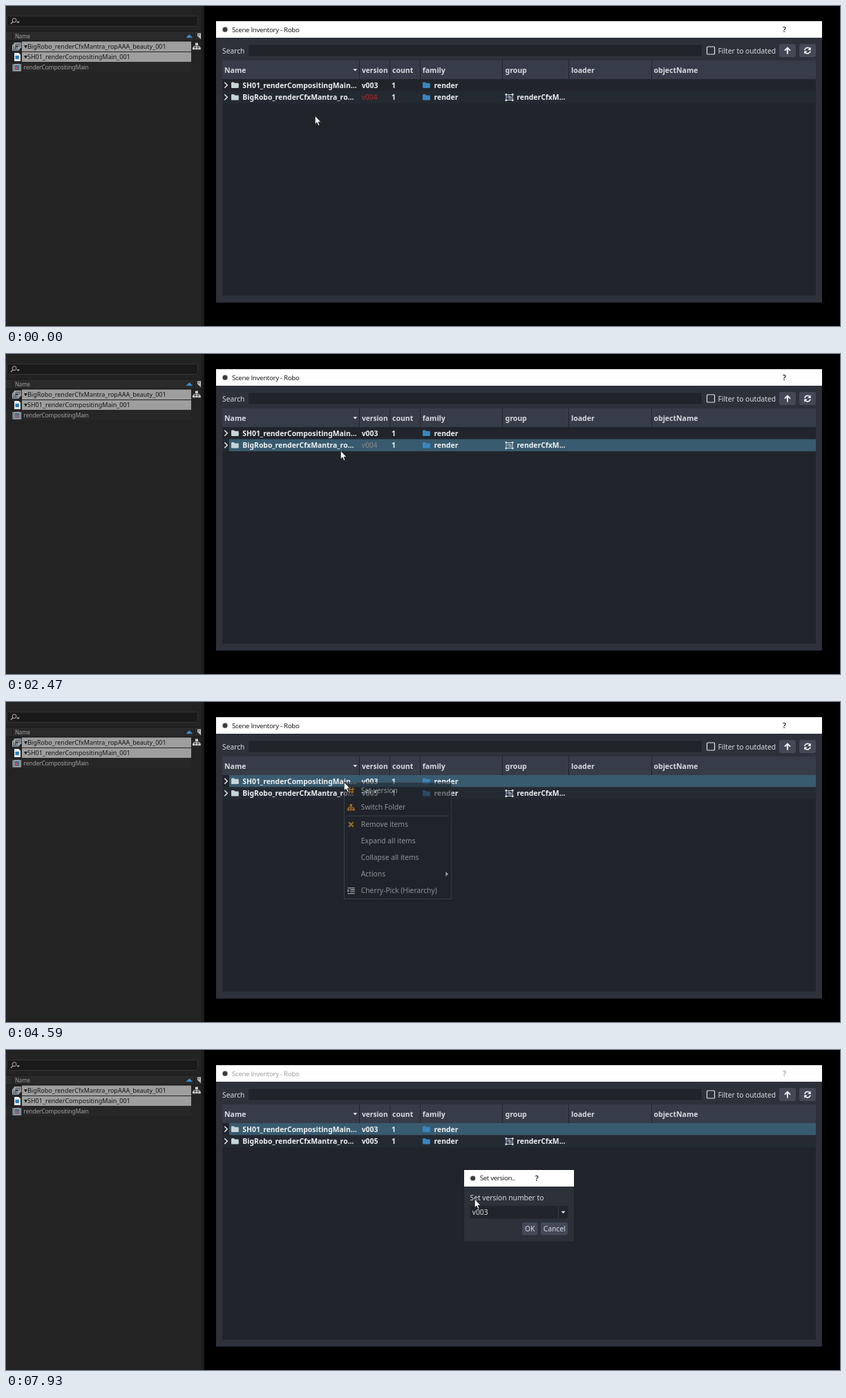
These frames come from a looping animation (1207x464 px, 8 s). An HTML page:

```html
<!DOCTYPE html>
<html lang="en">
<head>
<meta charset="utf-8">
<title>Scene inventory</title>
<style>
html, body { margin: 0; width: 100%; height: 100%; overflow: hidden; background: #000; }
svg { display: block; width: 1207px; height: 464px; }
text { font: 10.25px "Noto Sans", sans-serif; fill: #d9dde2; white-space: pre; }
.b { font-weight: 700; font-size: 10.4px; fill: #eef1f3; }
.head text { font-weight: 700; font-size: 10.5px; fill: #d6dbe1; }
.title text { font: 9.7px "Open Sans", "Noto Sans", sans-serif; letter-spacing: -.3px; fill: currentColor; }
.title .q { font-size: 11px; font-weight: 600; }
.title path { stroke: currentColor; stroke-width: 1; fill: none; }
.side text { font-size: 9px; fill: #151515; }
.side .dim { font-size: 8.6px; letter-spacing: -.22px; fill: #a0a0a0; }
.line { fill: none; stroke: #eef1f3; stroke-width: 1.4; }
.hot { fill: #4a4e57; }

/* One 8 s loop drives everything; 1% = 80 ms. */
.cursor, .row1, .row2, .old, .new, .menu1, .menu2, .on1, .on2, .on3, .dialog, .main {
  animation: 8s step-end infinite;
}
.cursor { animation-name: cursor; animation-timing-function: linear; }
.row1 { animation-name: row1; }
.row2 { animation-name: row2; }
.old { animation-name: old; }
.new { animation-name: new; }
.menu1 { animation-name: menu1; }
.menu2 { animation-name: menu2; }
.on1 { animation-name: on1; }
.on2 { animation-name: on2; }
.on3 { animation-name: on3; }
.main { animation-name: main; }
.dialog { animation-name: dialog; transform-box: fill-box; transform-origin: center; }

@keyframes cursor {
  0% { transform: translate(447px, 159px); }
  2.5% { transform: translate(447px, 159px); animation-timing-function: steps(5, jump-both); }
  6.625% { transform: translate(460px, 131px); }
  21.75% { transform: translate(460px, 131px); animation-timing-function: steps(4, jump-both); }
  25.125% { transform: translate(484px, 140px); }
  45.375% { transform: translate(484px, 140px); animation-timing-function: steps(2, jump-start); }
  47.125% { transform: translate(486px, 157px); animation-timing-function: steps(2, jump-both); }
  48.875% { transform: translate(488px, 119px); animation-timing-function: steps(5, jump-end); }
  54% { transform: translate(489px, 116px); }
  63.25% { transform: translate(489px, 116px); animation-timing-function: steps(8, jump-both); }
  70.25% { transform: translate(525px, 159px); }
  82.875% { transform: translate(525px, 159px); animation-timing-function: steps(3, jump-both); }
  85.5% { transform: translate(531px, 139px); }
  90.625% { transform: translate(531px, 139px); animation-timing-function: steps(7, jump-both); }
  96.5% { transform: translate(656px, 207px); }
  97.375% { transform: translate(656px, 207px); animation-timing-function: steps(2, jump-both); }
  99.125%, 100% { transform: translate(678px, 216px); }
}
@keyframes row1 {
  0% { fill: #21252b; }
  48.875% { fill: #4a4e57; }
  55.625%, 100% { fill: #395b6f; }
}
@keyframes row2 {
  0% { fill: #242a32; }
  5% { fill: #4a4e57; }
  12.375% { fill: #395b6f; }
  37% { fill: #4a4e57; }
  45.375% { fill: #242a32; }
  48% { fill: #4a4e57; }
  48.875%, 100% { fill: #242a32; }
}
@keyframes old {
  0% { fill: #b42828; opacity: 1; }
  29.25% { fill: #8f8a88; opacity: 1; }
  37%, 100% { opacity: 0; }
}
@keyframes new { 0% { opacity: 0; } 37%, 100% { opacity: 1; } }
@keyframes menu1 {
  0% { opacity: 0; }
  13.25% { opacity: .02; }
  14.125% { opacity: .2; }
  15% { opacity: .6; }
  15.75% { opacity: 1; }
  29.25% { opacity: .4; }
  30.125% { opacity: .1; }
  30.875%, 100% { opacity: 0; }
}
@keyframes menu2 {
  0% { opacity: 0; }
  56.5% { opacity: .2; }
  57.375% { opacity: .6; }
  58.25% { opacity: 1; }
  87.25% { opacity: .4; }
  88.125% { opacity: .1; }
  88.875%, 100% { opacity: 0; }
}
@keyframes on1 { 0% { opacity: 0; } 21.75%, 100% { opacity: 1; } }
@keyframes on2 {
  0% { opacity: 0; }
  63.25% { opacity: 1; }
  67.625% { opacity: 0; }
  85.5%, 100% { opacity: 1; }
}
@keyframes on3 {
  0% { opacity: 0; }
  67.625% { opacity: 1; }
  85.5%, 100% { opacity: 0; }
}
@keyframes main { 0% { color: #111; } 89.75%, 100% { color: #999; } }
@keyframes dialog {
  0% { opacity: 0; transform: scale(.92); }
  89.75% { opacity: .3; transform: scale(.95); }
  90.625% { opacity: .75; transform: scale(.98); }
  91.5%, 100% { opacity: 1; transform: none; }
}
</style>
</head>
<body>
<svg viewBox="0 0 1207 464">
  <defs>
    <path id="folder" d="M0 1.2Q0 0 1.2 0H3.8L5.2 1.4H9.6Q10.8 1.4 10.8 2.6V7.4Q10.8 8.6 9.6 8.6H1.2Q0 8.6 0 7.4Z"/>
    <path id="chevron" class="line" d="M0 0L4 4L0 8"/>
    <path id="down" fill="#e6e9ec" d="M0 0H6L3 3.2Z"/>
    <path id="cross" d="M0 0L8.6 8.6M8.6 0L0 8.6"/>
    <!-- Menu entries shared by both context menus -->
    <g id="entries">
      <g fill="none" stroke="#ee9a24" stroke-width="1.4">
        <path d="M8.8 7.3L7.3 16.7M12.8 7.3L11.3 16.7M5.6 10.2H15M5 13.8H14.4"/>
        <path stroke-width="1.1" d="M10 34V39M6.3 38.5V36.3H13.7V38.5"/>
        <path stroke-width="2.2" d="M6.7 57.7L13.3 64.3M13.3 57.7L6.7 64.3"/>
      </g>
      <path fill="#ee9a24" d="M8.2 31.3H11.8V34.6H8.2ZM4.5 38H8V41H4.5ZM8.7 38H11.3V41H8.7ZM12 38H15.5V41H12Z"/>
      <path stroke="#4b5362" d="M3 48.5H152"/>
      <text x="24.5" y="15.7">Set version</text>
      <text x="24.5" y="39.7">Switch Folder</text>
      <text x="24.5" y="64.7">Remove items</text>
      <text x="24.5" y="88.7">Expand all items</text>
      <text x="24.5" y="112.7">Collapse all items</text>
      <text x="24.5" y="136.7">Actions</text>
      <text x="24.5" y="160.7">Cherry-Pick (Hierarchy)</text>
      <path fill="#e6e9ec" d="M147 129.5L151 133L147 136.5Z"/>
      <path class="line" d="M5 153H15.5M9 155.7H15.5M9 158.3H15.5M5 161H15.5"/>
      <path fill="#eef1f3" d="M5 154.7L7.8 157L5 159.3Z"/>
    </g>
  </defs>

  <rect width="1207" height="464"/>

  <g class="side">
    <rect width="287" height="464" fill="#232323"/>
    <rect x="283" width="4" height="464" fill="#1b1b1b"/>
    <rect x="1.5" y="14.5" width="276" height="15" rx="2" fill="#1a1a1a" stroke="#343434"/>
    <circle cx="12" cy="20.7" r="2.9" fill="none" stroke="#b5b5b5"/>
    <path fill="none" stroke="#b5b5b5" stroke-width="1.2" d="M10 22.8L7 26"/>
    <path fill="#b5b5b5" d="M15 22.5H20L17.5 25Z"/>
    <rect y="37" width="283" height="13" fill="#2a2a2a"/>
    <path stroke="#171717" d="M0 36.5H283M0 50.5H283M9.5 38V50M272.5 38V50"/>
    <text class="dim" x="13" y="47" style="font-size:8px">Name</text>
    <path fill="#378fd6" d="M260.5 46L265.3 41.3L270 46Z"/>
    <path fill="#c4c4c4" d="M277 39.5H282V48L277 43.5Z"/>
    <circle cx="279.2" cy="41.8" r=".9" fill="#2a2a2a"/>
    <rect y="82" width="268" height="14" fill="#272727"/>
    <path fill="#9e9e9e" d="M23 51.5H268V66H23ZM23 67H268V81H23Z"/>
    <path fill="#1a1a1a" d="M26 57H31L28.5 61.5ZM26 72H31L28.5 76.5Z"/>
    <text x="31" y="62">BigRobo_renderCfxMantra_ropAAA_beauty_001</text>
    <text x="31" y="77">SH01_renderCompositingMain_001</text>
    <text class="dim" x="25.5" y="92.3">renderCompositingMain</text>
    <g fill="#303a42" stroke="#b9b9b9">
      <path d="M12.5 53.5H21.5V60.5H12.5ZM11 55H19.8V62.3H11ZM9.5 57H18.3V64.3H9.5Z"/>
      <path stroke="#6f98b8" d="M11.5 62L13.6 59.7L16 62"/>
    </g>
    <path fill="#e4e8ec" d="M12 68H18.5L21 70.5V80H12Z"/>
    <path fill="#2d80bd" d="M13.5 72H18.8V77H13.5Z"/>
    <path fill="#b0b0b0" d="M9.5 84H22V94.5H9.5Z"/>
    <path stroke="#333" stroke-width="1.2" stroke-dasharray="1.3 1.3" d="M11 84V94.5M20.5 84V94.5"/>
    <path fill="#416f96" d="M12.5 85.5H19V93H12.5Z"/>
    <circle cx="15" cy="90.2" r="2" fill="#b8594d"/>
    <path fill="#c8c8c8" d="M273.8 53.5H278V57H273.8ZM270 60H273.5V63.3H270ZM274.2 60H277.6V63.3H274.2ZM278.3 60H281.8V63.3H278.3Z"/>
    <path fill="none" stroke="#c8c8c8" d="M276 57V60M271.7 60V58.5H280V60"/>
  </g>

  <rect x="304" y="22" width="877" height="408" fill="#2c313a"/>
  <rect x="304" y="22" width="877" height="24" fill="#fff"/>
  <circle cx="317" cy="34.2" r="3.6" fill="#3a3d40"/>
  <g class="title main">
    <text x="327" y="37.8">Scene Inventory - Robo</text>
    <text class="q" x="1126.3" y="38" text-anchor="middle">?</text>
    <use href="#cross" x="1158" y="29.5"/>
  </g>

  <text x="313" y="68.7">Search</text>
  <rect x="350.5" y="55.5" width="657" height="18" rx="3" fill="#21252b" stroke="#303640"/>
  <rect x="1014.5" y="59" width="11" height="11" rx="1" fill="none" stroke="#e1e5e9" stroke-width="1.2"/>
  <text x="1030.5" y="68.7">Filter to outdated</text>
  <rect x="1119" y="55" width="24" height="19" rx="3" fill="#434a56"/>
  <rect x="1148" y="55" width="24" height="19" rx="3" fill="#434a56"/>
  <path class="line" stroke-width="2" style="stroke-width:2" d="M1131 69.5V61M1127 64.6L1131 60.6L1135 64.6"/>
  <path class="line" style="stroke-width:1.6" d="M1156 63.8A4.1 4.1 0 0 1 1163.3 62M1164 65.4A4.1 4.1 0 0 1 1156.7 67.2"/>
  <path fill="#eef1f3" d="M1164.8 59.5V64H1160.3ZM1155.2 69.7V65.2H1159.7Z"/>

  <rect x="313" y="79" width="859" height="341" fill="#21252b"/>
  <g class="head">
    <rect x="313" y="79" width="859" height="27" fill="#373d48"/>
    <path stroke="#21252b" d="M511.5 79V106M555.5 79V106M599.5 79V106M718.5 79V106M814.5 79V106M934.5 79V106"/>
    <text x="316" y="96.6">Name</text>
    <text x="515" y="96.6" style="font-size:10.2px">version</text>
    <text x="559" y="96.6">count</text>
    <text x="602.7" y="96.6">family</text>
    <text x="722.5" y="96.6">group</text>
    <text x="818" y="96.6">loader</text>
    <text x="937.5" y="96.6">objectName</text>
    <use href="#down" x="502.3" y="91.3"/>
  </g>

  <rect x="313" y="123" width="859" height="18" fill="#242a32"/>
  <rect class="row1" x="323" y="106" width="849" height="17.5" fill="#21252b"/>
  <rect class="row2" x="323" y="123.5" width="849" height="17.5" fill="#242a32"/>
  <use href="#chevron" x="316.3" y="110.8"/>
  <use href="#chevron" x="316.3" y="128.3"/>
  <use href="#folder" x="326" y="110.4" fill="#c6d4d8"/>
  <use href="#folder" x="326" y="128" fill="#c6d4d8"/>
  <use href="#folder" x="603" y="110.4" fill="#3a86c1"/>
  <use href="#folder" x="603" y="128" fill="#3a86c1"/>
  <text class="b" x="342.3" y="118.7">SH01_renderCompositingMain...</text>
  <text class="b" x="342.3" y="136.3">BigRobo_renderCfxMantra_ro...</text>
  <text class="b" x="514.7" y="118.7">v003</text>
  <text class="old" x="514.7" y="136.3">v004</text>
  <g class="new"><text class="b" x="514.7" y="136.3">v005</text></g>
  <text class="b" x="558" y="118.7">1</text>
  <text class="b" x="558" y="136.3">1</text>
  <text class="b" x="619.5" y="118.7">render</text>
  <text class="b" x="619.5" y="136.3">render</text>
  <text class="b" x="739.3" y="136.3">renderCfxM...</text>
  <g fill="none" stroke="#cfd6dc">
    <path d="M724 128.5H733V136.5H724Z"/>
    <path stroke="#9aa9c0" d="M726.3 130.5H729.5V133H726.3ZM728.3 131.8H731V134.5H728.3Z"/>
    <path fill="#cfd6dc" stroke="none" d="M722.5 127H725V129.5H722.5ZM732 127H734.5V129.5H732ZM722.5 135.5H725V138H722.5ZM732 135.5H734.5V138H732Z"/>
  </g>

  <g class="menu1" opacity="0">
    <rect x="463" y="133" width="155" height="194" fill="#000" opacity=".22"/>
    <rect x="460.5" y="130.5" width="154.5" height="193.5" fill="#21252b" stroke="#4b5362"/>
    <rect class="hot on1" x="461" y="131" width="153.5" height="24"/>
    <path fill="none" stroke="#ee9a24" stroke-width="1.4" d="M466.5 142.5L470 139L473.5 142.5M466.5 147L470 143.5L473.5 147"/>
    <text x="484.5" y="146.7">Update to latest</text>
    <use href="#entries" x="460" y="155"/>
  </g>

  <g class="menu2" opacity="0">
    <rect x="492" y="119" width="155" height="169" fill="#000" opacity=".22"/>
    <rect x="489.5" y="116.5" width="155.5" height="169" fill="#21252b" stroke="#4b5362"/>
    <rect class="hot on2" x="490" y="117" width="154.5" height="24"/>
    <rect class="hot on3" x="490" y="141" width="154.5" height="24"/>
    <use href="#entries" x="489.3" y="116.6"/>
  </g>

  <g class="dialog" opacity="0">
    <rect x="662.5" y="174" width="160" height="104" fill="#2c313a" stroke="#1d2127"/>
    <rect x="663" y="174" width="159" height="24" fill="#fff"/>
    <circle cx="675.7" cy="186" r="3.6" fill="#3a3d40"/>
    <g class="title" color="#111">
      <text x="685.7" y="189.3">Set version..</text>
      <text class="q" x="768" y="189.5" text-anchor="middle">?</text>
      <use href="#cross" x="799.6" y="181"/>
    </g>
    <text x="671.5" y="217.7">Set version number to</text>
    <rect x="671.5" y="226" width="141.5" height="18.5" rx="2" fill="#21252b"/>
    <path stroke="#373d48" d="M799.5 226V244.5"/>
    <text x="674.8" y="239.4">v003</text>
    <use href="#down" x="803.5" y="233.8"/>
    <rect x="747" y="250" width="22.5" height="18.5" rx="3" fill="#434a56"/>
    <rect x="774" y="250" width="39" height="18.5" rx="3" fill="#434a56"/>
    <text x="758.3" y="263" text-anchor="middle">OK</text>
    <text x="793.7" y="263" text-anchor="middle">Cancel</text>
  </g>

  <path class="cursor" fill="#fff" stroke="#111" stroke-width=".7" stroke-linejoin="round" d="M.3 .3V12.4L3 9.9L5 14.5L6.9 13.7L5 9.2H8.8Z"/>
</svg>
</body>
</html>
```
